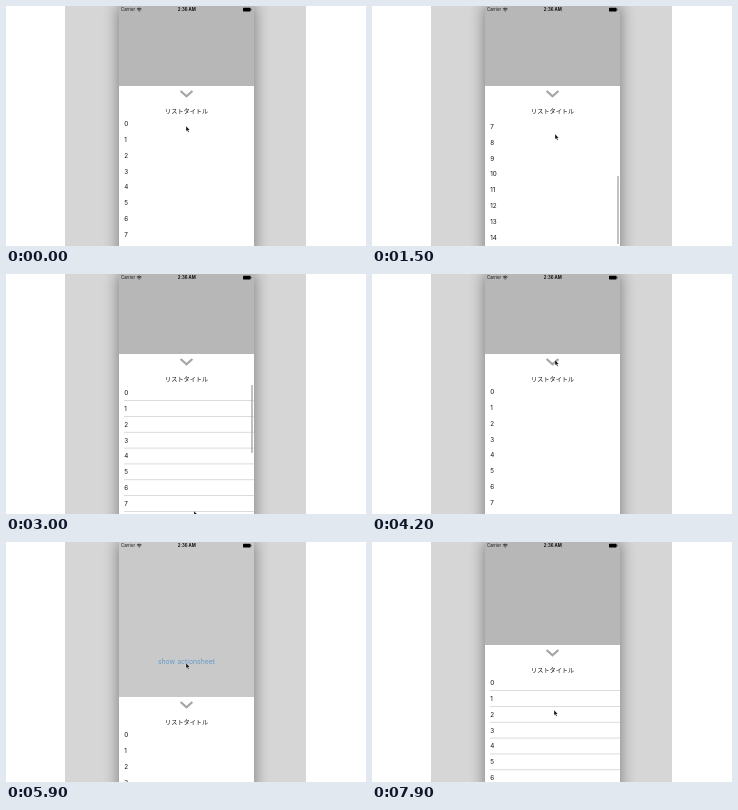
An HTML page for the animation above (8000 ms loop, 360x240 px).

```html
<!DOCTYPE html>
<html lang="ja">
<head>
<meta charset="utf-8">
<title>Action sheet</title>
<style>
  html, body { margin: 0; width: 100%; height: 100%; overflow: hidden; background: #fff; }
  svg { display: block; width: 360px; height: 240px; }
  text { font-family: Inter, "Liberation Sans", sans-serif; fill: #111; }
  .status { font-size: 4.3px; }
  .row { font-size: 6.3px; }
  .title { font-size: 6.15px; font-weight: 500; font-family: "Noto Sans CJK JP", "Noto Sans CJK", sans-serif; }
  .button { font-size: 6.9px; fill: #0a70cc; }
  .mid { text-anchor: middle; }
</style>
</head>
<body>
<svg viewBox="0 0 360 240">
  <defs>
    <filter id="blur" filterUnits="userSpaceOnUse" x="59" y="-60" width="241" height="380">
      <feGaussianBlur stdDeviation="8"/>
    </filter>
    <clipPath id="desk"><rect x="59" width="241" height="240"/></clipPath>
    <clipPath id="screen"><rect x="113" width="135" height="240"/></clipPath>
    <clipPath id="listBox"><rect x="113" y="30" width="135" height="240"/></clipPath>
  </defs>

  <g clip-path="url(#desk)">
    <rect x="59" width="241" height="240" fill="#d6d6d6"/>
    <rect x="113" y="-1" width="135" height="270" opacity=".46" filter="url(#blur)"/>
  </g>

  <g clip-path="url(#screen)">
    <rect x="113" width="135" height="240" fill="#fcfcfc"/>
    <rect id="dim" x="113" width="135" height="240"/>
    <text id="button" class="button mid" x="180.5" y="122.2">show actionsheet</text>

    <text class="status" x="115" y="5.2">Carrier</text>
    <g fill="none" stroke="#111" stroke-width=".8">
      <path d="M130.9 3.1q2.3-2 4.6 0M131.8 4.1q1.4-1.2 2.8 0"/>
      <path d="M132.7 5h1"/>
    </g>
    <text class="status mid" x="180.8" y="5.2" font-weight="700">2:36 AM</text>
    <rect x="237" y="1.8" width="7.6" height="3.6" rx=".6"/>
    <rect x="244.8" y="2.9" width=".6" height="1.4"/>

    <g id="sheet">
      <rect x="113" width="135" height="300" fill="#fff"/>
      <path d="M174.6 5l5.9 5.3 5.9-5.3" fill="none" stroke="#a6a6a6" stroke-width="2.3"/>
      <text class="title mid" x="180.6" y="26.9">リストタイトル</text>
      <g clip-path="url(#listBox)">
        <g id="list"><g id="lines" fill="#d2d2d2"></g></g>
      </g>
      <rect id="thumb" x="245.4" width="1.2" height="68" rx=".6" fill="#9a9a9a"/>
    </g>
  </g>

  <path id="cursor" d="M0 0v5.3l1.2-1 .9 2 1-.4-.9-2h1.6z" fill="#111" stroke="#fff" stroke-width=".3"/>
</svg>
<script>
const LOOP = 8000, STEP = 100;
const TOP = 80, DROP = 160, DIM = .275;
const ROW = 15.83, ROWS = 15, MAX_SCROLL = 108;
const $ = id => document.getElementById(id);

function add(parent, tag, attrs, text = '') {
  const el = document.createElementNS('http://www.w3.org/2000/svg', tag);
  for (const key in attrs) el.setAttribute(key, attrs[key]);
  el.textContent = text;
  parent.append(el);
}

for (let i = 0; i < ROWS; i++) {
  add($('list'), 'text', { class: 'row', x: 118.3, y: 40.1 + i * ROW }, i);
  add($('lines'), 'rect', { x: 118, y: 45.2 + i * ROW, width: 130, height: .8 });
}

const move = (id, x, y) => $(id).setAttribute('transform', `translate(${x} ${y})`);

function draw(now) {
  const t = Math.floor(now % LOOP / STEP) * STEP;

  // Eased progress, 0 to 1, of a movement between two times.
  const go = (from, to) => {
    const u = Math.min(1, Math.max(0, (t - from) / (to - from)));
    return u * u * (3 - 2 * u);
  };

  // Pointer drags: scroll the list up and back down, then pull the sheet twice.
  const swipe = MAX_SCROLL * go(700, 1400) - (MAX_SCROLL + 1) * go(2000, 3000);
  const pull = 46 * go(6600, 7100), secondPull = 23 * go(7500, 7900);

  const scroll = swipe + go(3000, 3200);
  const shift = DROP * (go(4400, 4867) - go(5700, 6084))
    + pull - 46 * go(7200, 7500) + secondPull;
  const dim = DIM * (1 - go(4400, 4720) + go(5700, 6000));

  // The pointer adds its free moves between the drags.
  const x = 180 + 3 * go(700, 1400) + 5 * go(2000, 3000) - 5 * go(3400, 4200)
    - 3 * go(5000, 5600) + 2 * go(6200, 6600);
  const y = 120 + 116 * go(100, 600) - swipe - 151 * go(3400, 4200)
    + 35 * go(5000, 5600) - 22 * go(6200, 6500) + pull + secondPull;

  move('sheet', 0, TOP + shift);
  move('list', 0, -scroll);
  move('thumb', 0, 31 + Math.max(0, scroll) / MAX_SCROLL * 59);
  move('cursor', x, y);
  $('thumb').style.opacity = go(600, 700) - go(1700, 1900) + go(1900, 2000) - go(3200, 3500);
  $('dim').style.opacity = dim;
  $('button').style.opacity = 1 - dim * 2.3;
  // Hairlines drop out at every third pixel of travel.
  $('lines').style.opacity = Math.round(shift - scroll) % 3 ? 1 : 0;
}

const start = performance.now();
function tick() {
  draw(performance.now() - start);
  requestAnimationFrame(tick);
}
tick();
</script>
</body>
</html>
```
